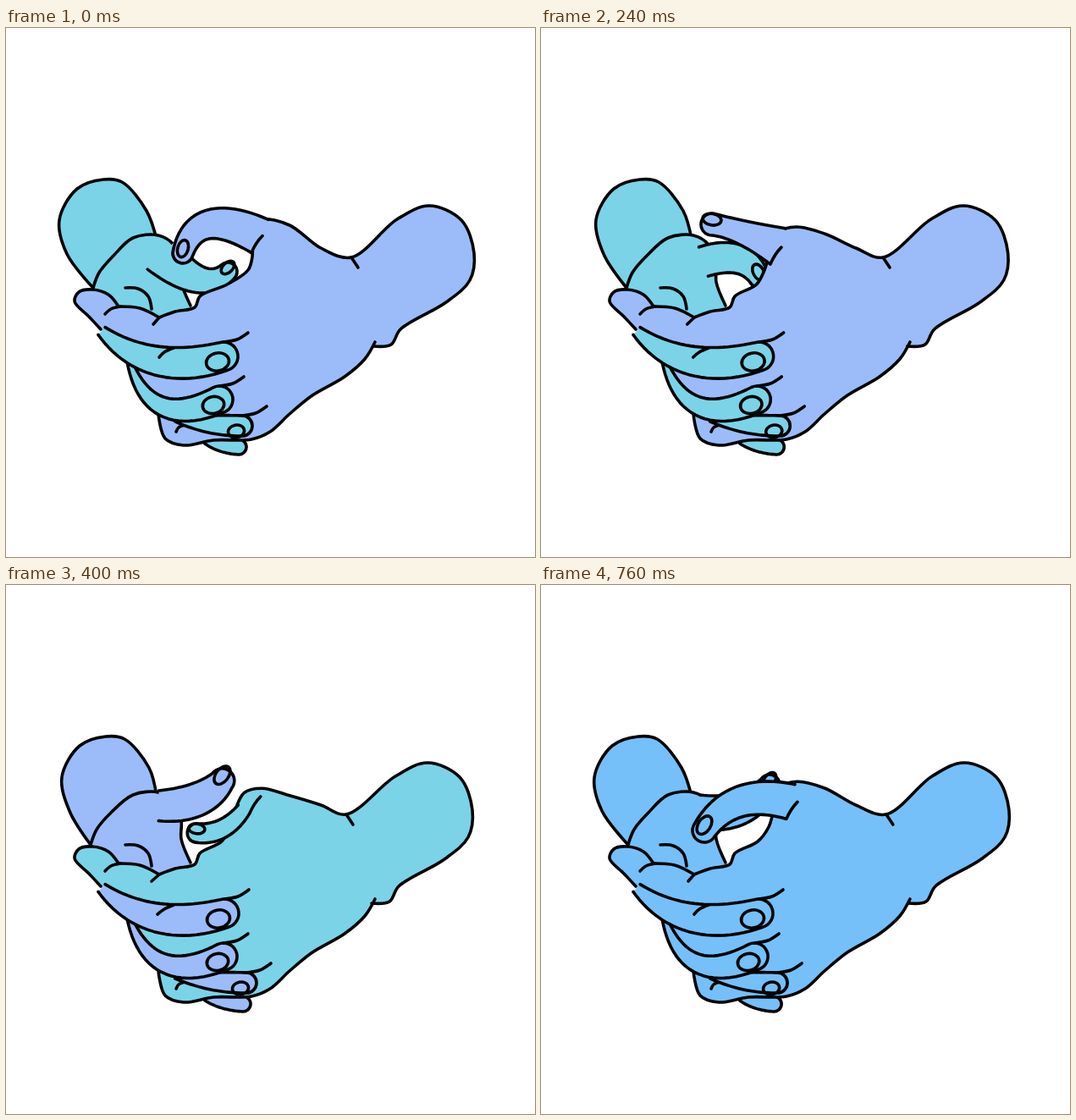
Recreate the animation shown at these times as an HTML page with a canvas. Size 625 by 625 pixels, loop 0.8 s.

```html
<!DOCTYPE html>
<html lang="en">
<head>
<meta charset="utf-8">
<title>Twiddling thumbs</title>
<style>
html, body { margin: 0; width: 100%; height: 100%; overflow: hidden; background: #fff; }
canvas { display: block; width: 100vw; height: 100vh; }
</style>
</head>
<body>
<canvas id="stage" width="625" height="625"></canvas>
<script>
const ctx = document.getElementById('stage').getContext('2d');
const LOOP = 800;
const LAVENDER = '#aeb1ff', TEAL = '#7cd9d9', BLUE = '#9bbcf8', CYAN = '#7bd3e8', SKY = '#75c0f9';

// A digit is three knots [x, y, radius], from its base to its tip.
// drop lowers the right knuckle, web moves the edge below it.
const front = {
  left: [[184, 268, 24], [228, 297, 16], [262, 288, 11]],
  right: [[300, 246, 22], [240, 232, 17], [209, 266, 12]], drop: 0, web: 24
};
const raised = {
  left: [[190, 268, 22], [225, 284, 16], [248, 301, 11]],
  right: [[291, 251, 25], [241, 226, 20], [201, 199, 15]], drop: 3, web: 13
};
const level = {
  left: [[192, 276, 18], [232, 273, 17], [257, 294, 12]],
  right: [[280, 258, 23], [236, 241, 14], [202, 232, 13]], drop: 10, web: 2
};
const tucked = {
  left: [[184, 262, 19], [230, 265, 22], [253, 254, 18]],
  right: [[290, 265, 6], [285, 268, 5], [280, 272, 4]], drop: 17, web: 0
};
const low = {
  left: [[178, 260, 17], [222, 246, 18], [257, 216, 12]],
  right: [[275, 265, 10], [236, 301, 15], [189, 307, 16]], drop: 15, web: 4
};
const crossing = {
  left: [[186, 268, 20], [235, 264, 19], [270, 236, 12]],
  right: [[295, 256, 21], [235, 256, 18], [193, 290, 14]], drop: 7, web: 7
};

const pinkie = [[236, 487, 4], [254, 492, 8], [275, 495, 9]];
const fingers = [
  [[200, 463, 2], [240, 468, 10], [279, 470, 12]],
  [[146, 394, 3], [185, 447, 11], [252, 439, 16]],
  [[113, 358, 6], [178, 393, 17], [257, 388, 17]]
];

const mix = (a, b, t) => {
  if (typeof a === 'number') return a + (b - a) * t;
  if (Array.isArray(a)) return a.map((v, i) => mix(v, b[i], t));
  return Object.fromEntries(Object.keys(a).map(key => [key, mix(a[key], b[key], t)]));
};

// [start ms, pose, left colour, right colour]
const steps = [
  [0, front, CYAN, BLUE],
  [120, raised, TEAL, LAVENDER],
  [200, mix(raised, level, .5), TEAL, LAVENDER],
  [240, level, CYAN, BLUE],
  [360, tucked, SKY, SKY],
  [400, mix(tucked, low, .6), BLUE, CYAN],
  [520, low, LAVENDER, TEAL],
  [640, mix(low, crossing, .5), BLUE, CYAN],
  [760, crossing, SKY, SKY]
];

// Centripetal Catmull-Rom spline through flat x, y points; a repeated point is a corner.
function spline(pts) {
  const path = new Path2D(), n = pts.length / 2;
  const at = i => {
    const j = 2 * Math.max(0, Math.min(n - 1, i));
    return [pts[j], pts[j + 1]];
  };
  const gap = (a, b) => Math.sqrt(Math.hypot(b[0] - a[0], b[1] - a[1]));
  const handle = (a, b, c, p, q) => p < .01 ? b : b.map((v, k) =>
    (p * p * c[k] - q * q * a[k] + (2 * p * p + 3 * p * q + q * q) * v) / (3 * p * (p + q)));
  path.moveTo(...at(0));
  for (let i = 0; i < n - 1; i++) {
    const [a, b, c, d] = [at(i - 1), at(i), at(i + 1), at(i + 2)];
    const mid = gap(b, c);
    if (mid > .01) {
      path.bezierCurveTo(...handle(a, b, c, gap(a, b), mid), ...handle(d, c, b, gap(c, d), mid), ...c);
    }
  }
  return path;
}

const line = (...pts) => ctx.stroke(spline(pts));

function paint(path, color) {
  ctx.fillStyle = color;
  ctx.fill(path);
  ctx.stroke(path);
}

// Place, radius and heading on the parabola through the three knots.
function along([a, m, c], t) {
  const [x, y, r] = a.map((v, i) => v * (1 - t) * (1 - 2 * t) + 4 * m[i] * t * (1 - t) + c[i] * t * (2 * t - 1));
  const [dx, dy] = a.map((v, i) => v * (4 * t - 3) + m[i] * (4 - 8 * t) + c[i] * (4 * t - 1));
  return { x, y, r, turn: Math.atan2(dy, dx) };
}

// Round-tipped tube, left open where it joins the hand.
function digit(knots, color, fold) {
  const path = new Path2D(), count = 24;
  const side = (i, sign) => {
    const p = along(knots, i / count), angle = p.turn + sign * Math.PI / 2;
    return [p.x + p.r * Math.cos(angle), p.y + p.r * Math.sin(angle)];
  };
  for (let i = 0; i <= count; i++) path.lineTo(...side(i, 1));
  const tip = along(knots, 1);
  path.arc(tip.x, tip.y, tip.r, tip.turn + Math.PI / 2, tip.turn - Math.PI / 2, true);
  for (let i = count; i >= 0; i--) path.lineTo(...side(i, -1));
  if (fold) {
    const [x, y] = side(0, -1);
    path.quadraticCurveTo(x + 5, y - 12, x + 13, y - 20);
  }
  paint(path, color);
  return tip;
}

function nail(x, y, rx, ry, turn) {
  ctx.beginPath();
  ctx.ellipse(x, y, rx, ry, turn, 0, Math.PI * 2);
  ctx.stroke();
}

function thumb(knots, color, fold) {
  if (knots[2][2] < 6) return;
  const { x, y, r, turn } = digit(knots, color, fold);
  nail(x, y - r * .45, r * .85, r * .52, turn);
}

// Shifts a finger's tip while its base stays in place.
const drift = (knots, dx) => knots.map(([x, y, r], i) => [x + dx * i / 2, y, r]);

function drawLeft(pose, color, sway) {
  const x = 3 * sway;
  paint(spline([178, 250, 166 + x, 216, 137 + x, 182, 115 + x, 179, 84 + x, 190, 63 + x, 227, 72 + x, 267, 103 - x, 307]), color);
  const palm = [103 - x, 307, 110 - x, 289, 127 - x, 269, 150, 248, 180, 245, 198, 256, 207, 278, 207, 300, 218, 328];
  ctx.fillStyle = color;
  ctx.fill(spline([...palm, 200, 345, 130, 337]));
  line(...palm);
  line(141, 307, 156, 308, 168, 317, 172, 332);
  thumb(pose.left, color);
  digit(drift(pinkie, 5 * sway), color);
}

function drawRight({ right, drop, web }, color, sway) {
  const wrist = 408 - 6 * sway;
  const arm = [434, 376, 455, 374, 466, 356, 520, 324, 548, 298, 553, 266, 538, 227, 500, 210, 462, 226]
    .map((v, i) => i % 2 ? v : v - 2 * sway);
  const back = [wrist, 271, 372, 260, 335, 233 + drop, 302, 226 + .9 * drop, 280 + .5 * web, 233 + .8 * drop];
  const edge = [267 + web, 270, 262 + web, 286, 254 + .3 * web, 303, 229, 317, 223, 330];
  const index = [200, 335, 181, 342, 181, 342, 158, 331, 133, 329, 133, 329,
    121, 315, 102, 309, 86, 312, 81, 323, 98, 341, 112, 356];
  const heel = [180, 456, 188, 485, 210, 493, 245, 487, 290, 486, 312, 477, 335, 456, 362, 434, 400, 412, 424, 391, 436, 371];
  const upper = [...arm, ...back, ...edge, ...index];
  ctx.fillStyle = color;
  ctx.fill(spline([...upper, 146, 388, 160, 425, ...heel]));
  line(...upper);
  line(...heel);
  line(wrist, 271, wrist + 8, 283);
  line(117, 338, 124, 332, 135, 329);
  line(174 - 2 * sway, 350, 181, 342);
  line(201, 477, 204, 472, 211, 469);
  thumb(right, color, true);
}

function drawFingers(color, sway) {
  fingers.forEach((knots, i) => {
    const { x, y, r } = digit(drift(knots, (i < 2 ? 5 : 1) * sway), color);
    line(x, y - r, x + 16, y - r - 3, x + 29, y - r - 11);
    nail(x - 7, y + 6.5, r * .8, r * .62, -.2);
  });
  line(181 - 2 * sway, 389, 187, 383, 198, 378);
}

function draw(now) {
  const t = now % LOOP;
  const [start, pose, left, right] = steps.findLast(step => step[0] <= t);
  const sway = Math.sin(Math.PI * start / LOOP) ** 2;
  ctx.fillStyle = '#fff';
  ctx.fillRect(0, 0, 625, 625);
  ctx.lineWidth = 3.6;
  ctx.lineCap = ctx.lineJoin = 'round';
  drawLeft(pose, left, sway);
  drawRight(pose, right, sway);
  drawFingers(left, sway);
}

let began;
function tick(now) {
  began ??= now;
  draw(now - began);
  requestAnimationFrame(tick);
}
draw(0);
requestAnimationFrame(tick);
</script>
</body>
</html>
```
